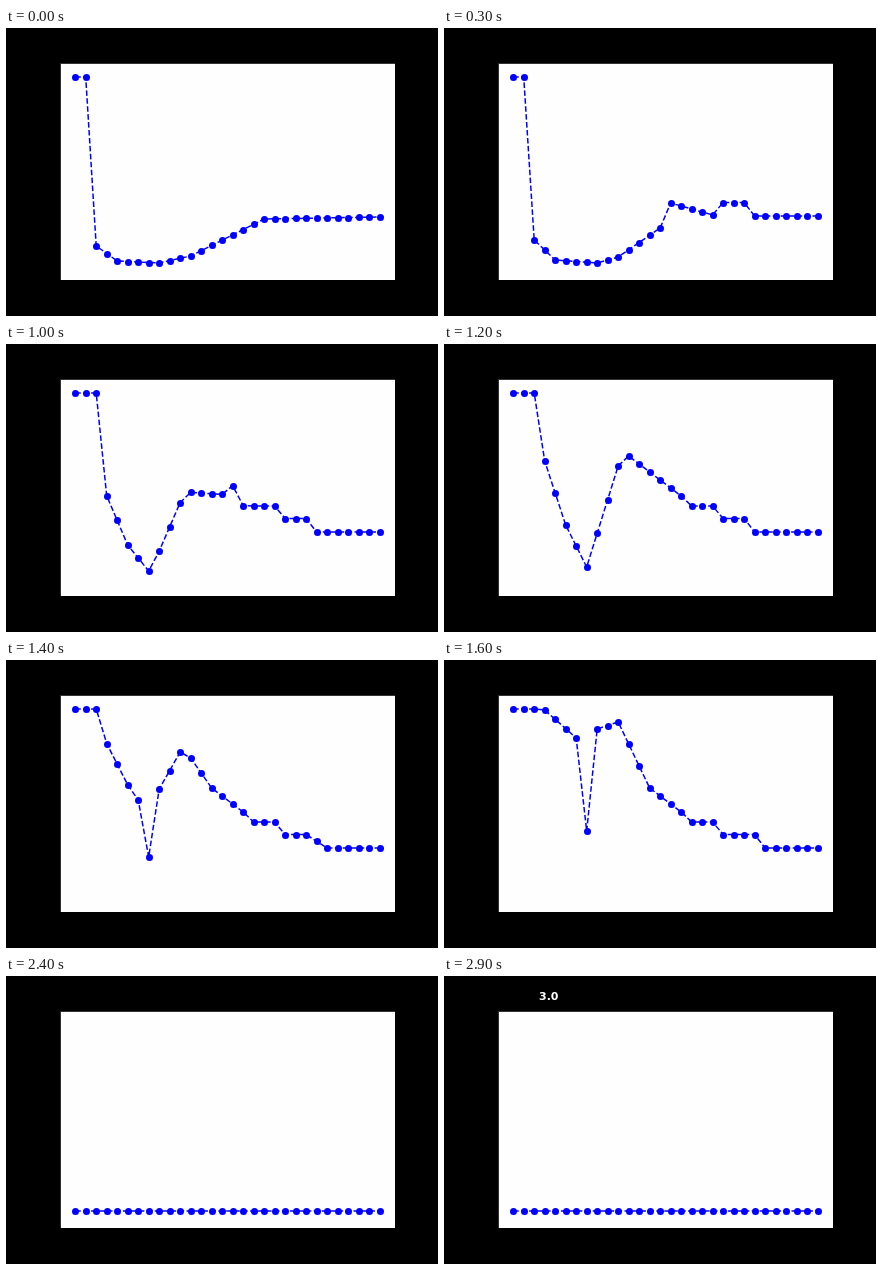
Animation of 432 by 288 pixels, one loop 3 s. Source, as an HTML page with a canvas:

```html
<!DOCTYPE html>
<html lang="en">
<head>
<meta charset="utf-8">
<title>Parameter sweep</title>
<style>
html, body { margin: 0; width: 100%; height: 100%; overflow: hidden; background: #000; }
canvas { display: block; }
</style>
</head>
<body>
<canvas id="plot" width="432" height="288"></canvas>
<script>
const ctx = document.getElementById('plot').getContext('2d');
const COUNT = 30, STEP = 100, STEPS = 30;
const TOP = 49, FLOOR = 235;
const COLLAPSE = 23;

// Corner points [index, y]; the top plateau comes before them, the stairs after.
const keys = [
  curve(0, [2, 218], [4, 233], [8, 235], [11, 228], [18, 191], [29, 189]),
  curve(3, [2, 212], [4, 232], [8, 235], [10, 229], [14, 200], [15, 175], [19, 187]),
  curve(7, [3, 204], [5, 231], [8, 234], [14, 172], [15, 138], [16, 176]),
  curve(12, [3, 117], [5, 181], [7, 223], [10, 122], [11, 112], [16, 152]),
  curve(16, [3, 50], [6, 78], [7, 171], [8, 69], [10, 62], [13, 128], [16, 152]),
  curve(20, [6, 54], [7, 72], [8, 51], [10, 51], [12, 76], [13, 108], [15, 118], [16, 161])
];

function lerp(a, b, p) {
  return a + (b - a) * p;
}

// Three levels on the right; the last one retreats as the sweep goes on.
function stairs(i, step) {
  const edge = Math.max(23, Math.floor(22.2 + 0.14 * step));
  return i < 20 ? 162 : i < edge ? 174.5 : 188;
}

function curve(step, ...corners) {
  const ys = Array.from({ length: COUNT }, (_, i) => {
    const n = corners.findIndex(c => c[0] >= i);
    if (n < 0) return stairs(i, step);
    const [x1, y1] = corners[n];
    if (i === x1) return y1;
    if (n === 0) return TOP;
    const [x0, y0] = corners[n - 1];
    return lerp(y0, y1, (i - x0) / (x1 - x0));
  });
  return { step, ys };
}

function heights(step) {
  if (step >= COLLAPSE) return Array(COUNT).fill(FLOOR);
  const next = keys.findIndex(k => k.step > step);
  if (next < 0) return keys[keys.length - 1].ys;
  const a = keys[next - 1], b = keys[next];
  const p = (step - a.step) / (b.step - a.step);
  // Very large differences are jumps, the rest drift.
  return a.ys.map((y, i) => Math.abs(b.ys[i] - y) > 130 ? y : lerp(y, b.ys[i], p));
}

function rect(color, x, y, w, h) {
  ctx.fillStyle = color;
  ctx.fillRect(x, y, w, h);
}

function draw(step) {
  const pts = heights(step).map((y, i) => [69.22 + 10.495 * i, y]);
  rect('#000', 0, 0, 432, 288);
  rect('#333', 54, 35, 335, 217);
  rect('#fefefe', 55, 36, 334, 216);

  if (step === STEPS - 1) {
    ctx.font = 'bold 11px "DejaVu Sans", sans-serif';
    ctx.fillText('3.0', 95, 24);
  }

  ctx.strokeStyle = ctx.fillStyle = '#00f';
  ctx.lineWidth = 1.5;
  ctx.lineJoin = 'round';
  ctx.setLineDash([5.55, 2.4]);
  ctx.beginPath();
  pts.forEach(([x, y]) => ctx.lineTo(x, y));
  ctx.stroke();

  for (const [x, y] of pts) {
    ctx.beginPath();
    ctx.arc(Math.round(x) + 0.5, Math.round(y) + 0.5, 3.5, 0, 2 * Math.PI);
    ctx.fill();
  }
}

const begin = performance.now();
function tick() {
  const t = Math.max(0, performance.now() - begin);
  draw(Math.floor(t / STEP) % STEPS);
  requestAnimationFrame(tick);
}
tick();
</script>
</body>
</html>
```
